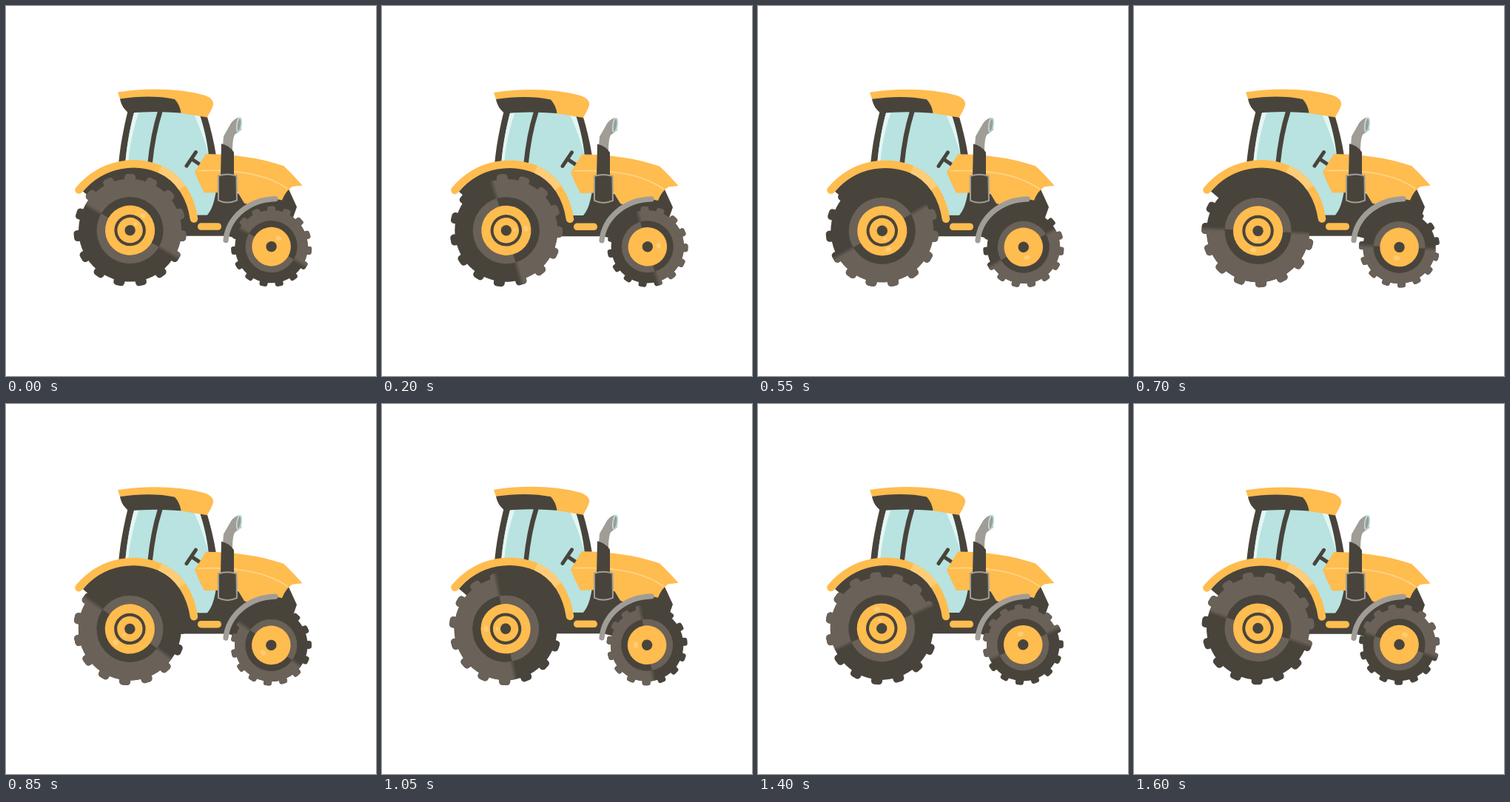
Animation of 500 by 500 pixels, one loop 1.65 s. Source, as an HTML page:

```html
<!DOCTYPE html>
<html lang="en">
<head>
<meta charset="utf-8">
<title>Tractor</title>
<style>
  html, body { margin: 0; width: 100%; height: 100%; overflow: hidden; background: #fff; }
  svg { display: block; width: 100vw; height: 100vh; }
  .gold { fill: #ffbc4f; }
  .pale { fill: #ffcd78; }
  .dark { fill: #48443c; }
  .brown { fill: #6a6158; }
  .glass { fill: #b8e3e0; }
  .shine { fill: #e4f6f4; }
  .gray { fill: #a09d96; }
  .line { fill: none; stroke-linecap: round; stroke-linejoin: round; }
</style>
</head>
<body>
<svg viewBox="0 0 500 500">
  <defs>
    <linearGradient id="fade" gradientUnits="userSpaceOnUse" x1="0" y1="-3" x2="0" y2="3">
      <stop offset="0" stop-color="#fff"/><stop offset="1" stop-color="#000"/>
    </linearGradient>
    <mask id="upper" maskUnits="userSpaceOnUse" x="-90" y="-90" width="180" height="180">
      <rect x="-90" y="-90" width="180" height="180" fill="url(#fade)"/>
    </mask>
    <clipPath id="lower"><rect x="-90" y="0" width="180" height="90"/></clipPath>
  </defs>

  <g class="body">
    <!-- cabin -->
    <path class="dark" d="M165 140 L271 146 C276 163 281 182 284 202 L284 250 L236 282 L152 214 C154 190 159 164 165 140Z"/>
    <path class="glass" d="M174 140 L261 144 C268 165 272 182 274 202 L290 252 C282 262 279 273 273 282 L240 282 L161 216 C163 190 167 165 174 140Z"/>
    <path class="shine" d="M174 140 L180.500 140 C172 165 167 188 165 214 L161 214 C163 190 167 165 174 140Z"/>
    <path class="shine" d="M253 144 L261 144 C267 163 271 180 273 198 C268 180 262 163 253 144Z"/>
    <path class="line" stroke="#48443c" stroke-width="6.5" d="M208 143 C201 165 197 188 194.500 213"/>
    <path class="line" stroke="#48443c" stroke-width="5" d="M256.500 197 L244 215.500 M250.500 206 L264 215"/>

    <!-- roof -->
    <path class="gold" d="M151 116 C190 109.500 237 111 268 120 C277 123 281 128 280 133 C278 140 275 144 272 150 L235 144 L154 125Z"/>
    <path class="dark" d="M154 125 C180 121 207 121 228 125.500 Q235 133 236.500 144 Q200 141 166 144 C160 140 156 134 154 125Z"/>

    <!-- chassis and wheel wells -->
    <path class="dark" d="M104 250 C135 212 180 213 206 224 C232 236 246 262 250 290 L238 310 L168 304Z"/>
    <path class="dark" d="M272 282 C279 274 282 262 284 248 L345 258 L312 285 L297 310.300 L236 310.300 L236 282Z"/>
    <path class="dark" d="M299 310.300 C306 285 330 262 366 258 L382 247 L393 271 L387 288 L358 325Z"/>
    <rect class="gold" x="259" y="292.700" width="32" height="9.500" rx="4.500"/>

    <!-- hood -->
    <path class="gold" d="M270 199.500 C307 199.500 342 204.500 375 215.500 C384 223.500 392 232.500 400.500 242 L387 243.500 Q378 249 373 262 L364 260 Q343 260 328 268 L322 266 L313 251 L268 252 Q261 239 255 224Z"/>
    <path class="line" stroke="#ffd27f" stroke-width="2" d="M260 222 C305 220 350 225 380 246"/>

    <!-- exhaust -->
    <path class="gray" d="M293 188 L294 175.500 L304 158 Q308 152 315 150 Q319 155 318 167 L309.500 173 Q306 177 306 197Z"/>
    <ellipse cx="315" cy="160" rx="3" ry="9.500" transform="rotate(8 315 160)" fill="#a09d96" stroke="#b8e3e0" stroke-width="1.500"/>
    <path class="dark" d="M291 185.500 Q302 188 308 197 L308 230 L290 230Z"/>
    <path class="dark" stroke="#a09d96" stroke-width="2" d="M287 229 Q299 225 311.500 229 L312 262 Q299 268 287 262Z"/>
  </g>

  <g class="wheels"></g>

  <g class="body">
    <path class="line" stroke="#ffbc4f" stroke-width="10.5" d="M98.500 248 C132 208.500 178 207.500 208 220 C236 232 250 260 254 287"/>
    <path class="line" stroke="#ffcd78" stroke-width="10.5" style="stroke-linecap:butt" d="M208 220 Q227 228.500 238 245"/>
    <path class="line" stroke="#a09d96" stroke-width="7.200" d="M297 316 C300 285 328 261 364 260"/>
  </g>
</svg>

<script>
const LOOP = 1650, STEP = 50, TEETH = 15;
const range = n => [...Array(n).keys()];
const disc = (r, cls, extra = "") => `<circle r="${r}" class="${cls}" ${extra}/>`;
const glint = (r, size) =>
  `<ellipse class="pale" cy="${-r}" rx="${size}" ry="${size * 0.8}" transform="rotate(11)"/>`;

function tyre(w, cls, extra = "") {
  const teeth = range(TEETH).map(i =>
    `<rect x="${w.base - 8}" y="${-w.tooth / 2}" width="${w.outer - w.base + 8}" height="${w.tooth}"
      rx="${w.tooth * 0.3}" transform="rotate(${i * 360 / TEETH})"/>`).join("");
  return `<g class="${cls}" ${extra}>${disc(w.base, cls)}${teeth}</g>`;
}

// The tyre is light above its split line, the rim light below it.
function wheel(w) {
  const ring = w.ring
    ? disc(w.ring, "line", 'stroke="#48443c" stroke-width="4"') + glint(11.5, 2.6) : "";
  return `<g class="wheel" data-x="${w.x}" data-y="${w.y}">
    ${tyre(w, "dark")}
    ${tyre(w, "brown", 'mask="url(#upper)"')}
    ${disc(w.rim, "dark")}
    ${disc(w.rim, "brown", 'clip-path="url(#lower)"')}
    ${disc(w.hub, "gold")}${ring}${disc(7.2, "dark")}
    ${glint(w.glint, 4)}
  </g>`;
}

document.querySelector(".wheels").innerHTML = [
  { x: 167.5, y: 303.5, outer: 76.2, base: 69.5, tooth: 15, rim: 45, hub: 33.6, ring: 19.2, glint: 26.7 },
  { x: 358.5, y: 325.5, outer: 54.6, base: 49.2, tooth: 11, rim: 35, hub: 26.3, glint: 15 }
].map(wheel).join("");

const wheels = document.querySelectorAll(".wheel");
const bodies = document.querySelectorAll(".body");

function draw(now) {
  const t = Math.floor(now % LOOP / STEP) * STEP;
  const turn = 30 + 360 * t / LOOP;
  const bob = 0.4 + 0.6 * Math.cos(2 * Math.PI * (t - 350) / LOOP);
  for (const b of bodies) b.setAttribute("transform", `translate(0 ${bob})`);
  for (const w of wheels)
    w.setAttribute("transform",
      `translate(${w.dataset.x} ${w.dataset.y}) rotate(${turn}) translate(-.1 -.4)`);
  requestAnimationFrame(draw);
}
draw(0);
</script>
</body>
</html>
```
